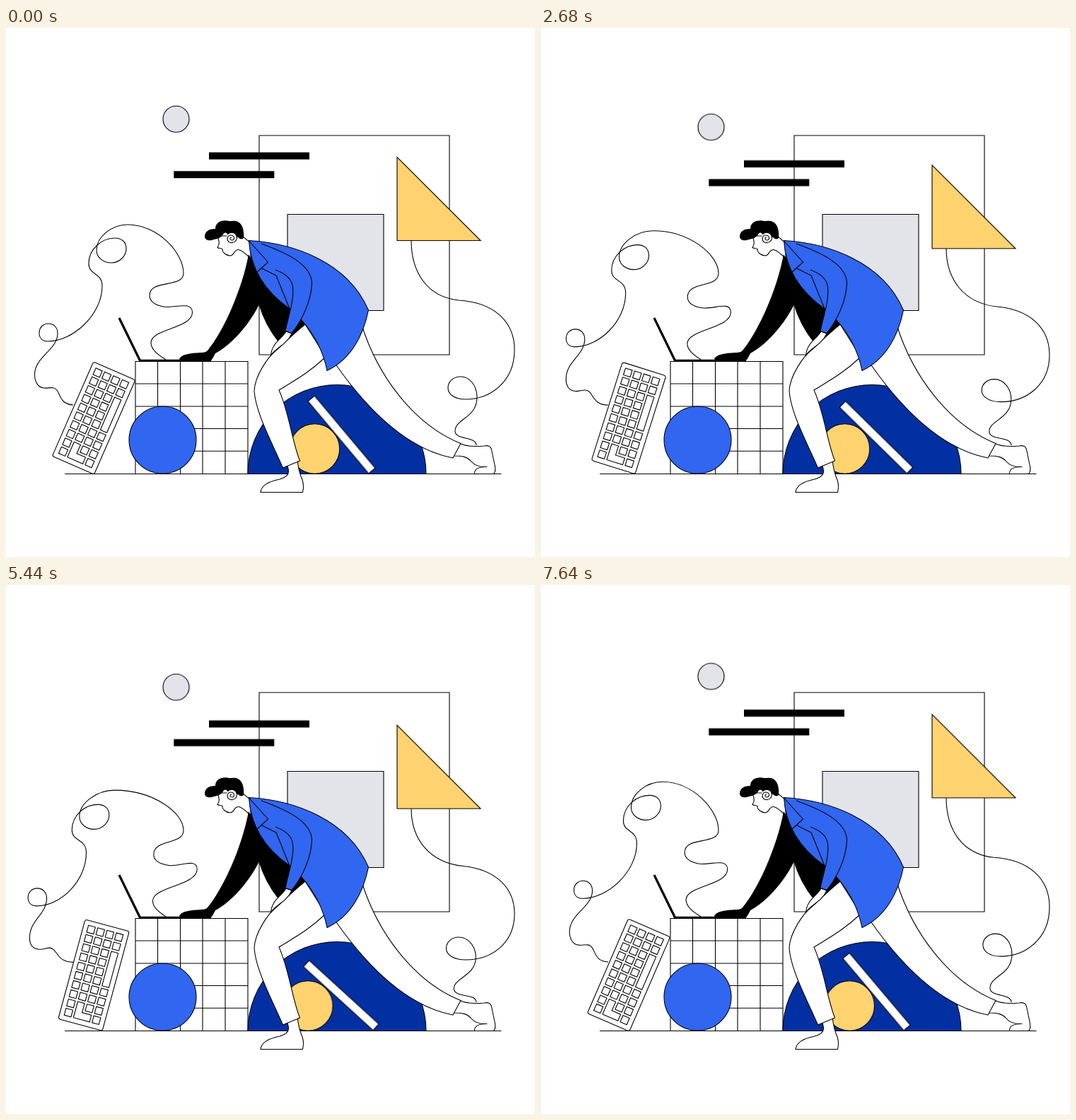
Write an HTML page without scripts that moves like this. It is 748x748 px and loops after 7.68 s.

```html
<!DOCTYPE html>
<html lang="en">
<head>
<meta charset="utf-8">
<title>Balancing shapes</title>
<style>
html, body { margin: 0; width: 100%; height: 100%; overflow: hidden; background: #fff; }
svg { display: block; width: 100vw; height: 100vh; stroke: #000; stroke-width: 1.1; fill: none; }
.white { fill: #fff; }
.blue { fill: #3166f0; }
.navy { fill: #0230a3; }
.grey { fill: #e3e4ea; }
.gold { fill: #ffd36f; }
.black { fill: #000; }
.solid { fill: #000; stroke: none; }
.move { animation: 1.92s linear infinite alternate; }
.float { animation-name: float; }
.ball { animation-name: ball; }
.plank { animation-name: plank; }
.wire-l { animation-name: wire-l; }
.wire-r { animation-name: wire-r; }
@keyframes float { from { transform: translateY(0); } to { transform: translateY(18.8px); } }
@keyframes ball { from { transform: translateX(0); } to { transform: translateX(-11.5px); } }
@keyframes plank {
  from { transform: translate(474.5px, 575px) rotate(50deg); }
  to { transform: translate(473.7px, 581.3px) rotate(40.9deg); }
}
@keyframes wire-l {
  from { d: path("M226 469C215 462 205 455 205 445C205 425 263.500 425 263.500 402C263.500 385 236 397 222 394C208 391 203 385 203 378C203 355 251 368 251 347C251 318 215 278 172 278C150 278 128 295 128 314C128 325 138 332 149 332C161 332 170 322 170 312C170 302 163 297 154 297C135 297 117 313 117 333C117 350 136 345 136 365C136 405 95 443 59 443C51 443 47 438 47 431C47 423 53 418 60 418C68 418 73 424 73 432C73 455 40.500 465 40.500 490C40.500 500 45 508 53 509C60 510 67 506 72 512C77 519 77 532 95 533"); }
  to { d: path("M226 469C217 463 208 456 208 447C208 427 271.500 425 271.500 402C271.500 385 247 399 232 397C217 395 210 389 210 382C210 359 251 368 251 347C251 322 206 292.500 150 292.500C124 292.500 99 311 99 330C99 341 109 348 120 348C132 348 141 338 141 328C141 318 134 313 125 313C106 313 88.500 329 88.500 349C88.500 366 109 361 109 381C109 421 74 456 40 456C32 456 28 451 28 444C28 436 34 431 41 431C49 431 54.500 437 54.500 445C54.500 468 32 475 32 500.500C32 511 37 516 46 516.500C53 517 60 511 66 516C74 523 75 533 95 533.500"); }
}
@keyframes wire-r {
  from { d: path("M573 300C573 345 595 380 640 385C690 388 719 415 719 455C719 500 685 525 650 525C636 525 625 519 625 509C625 500 632 493 643 493C656 493 666 506 666 522C666 552 635 552 635 570C635 583 665 577 665 590"); }
  to { d: path("M573 318.800C573 363 600 395 648 400C692 405 719 430 719 467C719 505 690 531 650 531C635 531 622 525 622 515C622 506 629 499 640 499C653 499 664 512 664 527C664 553 633 556 633 571C633 584 665 577 665 590"); }
}
</style>
</head>
<body>
<svg viewBox="0 0 748 748">
  <defs>
    <path id="k1" d="M0 0h10v10h-10z"/>
    <path id="k2" d="M0 0h10v10h-10zM0 13.500h10v10h-10z"/>
    <g id="k4"><use href="#k2"/><use href="#k2" y="27"/></g>
    <g id="k8"><use href="#k4"/><use href="#k4" y="54"/></g>
  </defs>

  <!-- backdrop -->
  <path d="M358 152H627V462H358z"/>
  <path class="grey" d="M398 263.500H534V399.500H398z"/>
  <path class="move wire-r"/>
  <path class="move wire-l"/>
  <g class="move float">
    <circle class="grey" cx="240.500" cy="128.700" r="18.500"/>
    <path class="solid" d="M287 175.800h142v10h-142zM237.300 202.200h142v10h-142z"/>
    <path class="gold" d="M553 182.500V300.500H671z"/>
  </g>

  <!-- dome, ball and plank -->
  <path class="navy" d="M342 630.500A126 126 0 0 1 594 630.500z"/>
  <circle class="gold move ball" cx="436.500" cy="595" r="35.200"/>
  <rect class="white move plank" x="-66.700" y="-6" width="133.400" height="12"/>

  <!-- keyboard -->
  <g class="white" transform="translate(124.100 551.600)">
    <g transform="rotate(23.600)">
      <animateTransform attributeName="transform" type="rotate" values="23.600;13.500;23.600" dur="3.84s" repeatCount="indefinite"/>
      <rect x="-32.300" y="-72.800" width="64.600" height="145.600" rx="3"/>
      <use href="#k8" x="-25.600" y="-66"/>
      <use href="#k2" x="-25.600" y="42"/>
      <use href="#k8" x="-12" y="-66"/>
      <use href="#k8" x="1.600" y="-66"/>
      <use href="#k1" x="1.600" y="42"/>
      <use href="#k2" x="15.200" y="-66"/>
      <path d="M15.200-39h10v50.500h-10z"/>
      <use href="#k4" x="15.200" y="15"/>
      <path d="M-12 42h10v13.500h13.600v10h-23.600z"/>
    </g>
  </g>

  <!-- grid box -->
  <path d="M183 630.500V471.500H342V630.500M214.500 471.500v159M246.500 471.500v159M278 471.500v159M310 471.500v159M183 503h159M183 535h159M183 566.500h159M183 598.200h159"/>
  <circle class="blue" cx="221.500" cy="582.500" r="47.500"/>
  <path d="M83 630.500H700.500"/>

  <!-- legs -->
  <g class="white" stroke-linejoin="round">
    <path d="M641 587C650 592 664 592 676 591C682 590 685 591 686.500 596L691.500 620C692.500 627 691 630.500 688 630.500H662.500C662 624 668 620 680 620.500C670 621 663 619 658 613C652 606 645 605 633 605z"/>
    <path d="M503 420C525 490 575 560 643 587.500L632 608C575 597 518 550 465 474z"/>
    <path d="M397 617C402 629 400 634 387 638C372 641 361 646 360 656.500H419.500C421 650 421 645 419 639C415 630 413 622 412 610z"/>
    <path d="M345 320L358 391C365 415 377 433 386.500 445L404 436L424 419L415 375z" class="black"/>
    <path d="M383 455C370 465 352 492 351 513C353 545 378 590 391.500 622L415.500 612C405 587 400 542 386 512C407 499 428 488 452 465L423 419C408 431 395 444 383 455z"/>
    <path d="M396 429C389 441 376 445 374.500 463C380 453 397 448 404 432z"/>
  </g>

  <!-- face and hair -->
  <path class="white" d="M299 294C302 303 302 306 299 310.500C301 312 304 311 306 312.500C305 317 311 321.500 317 322C323 322 322 313 329 313.500C335 315 340 320 346 326V304L334 294z"/>
  <path class="solid" d="M281 295C281 287 288 284 296 284C296 276 303 271.500 313 272.500C319 274 322 271.500 328 274C334 277 337 285 336 297C334 299 331 299 328 296L313 291C310 289 309 289 307 292C303 298 297 298 291 300C285 301 281 299 281 295z"/>
  <circle class="white" cx="319" cy="296.500" r="7" stroke="none"/>
  <path d="M313 292C316 288 324 288 326 294C328 301 322 305 316 303C311 300 313 293 318 293C323 293 324 299 320 300C316 300 316 296 319 296"/>

  <!-- laptop and arm -->
  <path d="M160 410L189.500 470.300H290" stroke-width="3.200"/>
  <path class="solid" d="M343 320C335 365 310 425 285 456C282 459 278 459 274 459C262 460 248 461 245 468L248 471.500H289C292 468 294 464 296 460C320 447 344 419 358 391L376 376z"/>

  <!-- jacket -->
  <g class="blue" stroke-linejoin="round">
    <path d="M343.500 300.500C405 304 483 330 512.500 399C505 436 487 469 454 484.500C448 455 434 431 418 413L401 397C374 378 346 348 343.500 300.500z"/>
    <path stroke="none" d="M381 342C408 352 409 366 403 395L395 428.500L404 431.500C417 416 432 387 432.500 360L410 330z"/>
    <path fill="none" d="M381 342C408 352 409 366 403 395C400 408 397 418 395 428.500L404 431.500C417 416 432 387 432.500 360C431 334 397 318 361 305M343.500 301L370.500 331L353.500 346.500M361 339.500L382 350L401 397"/>
  </g>
</svg>
</body>
</html>
```
